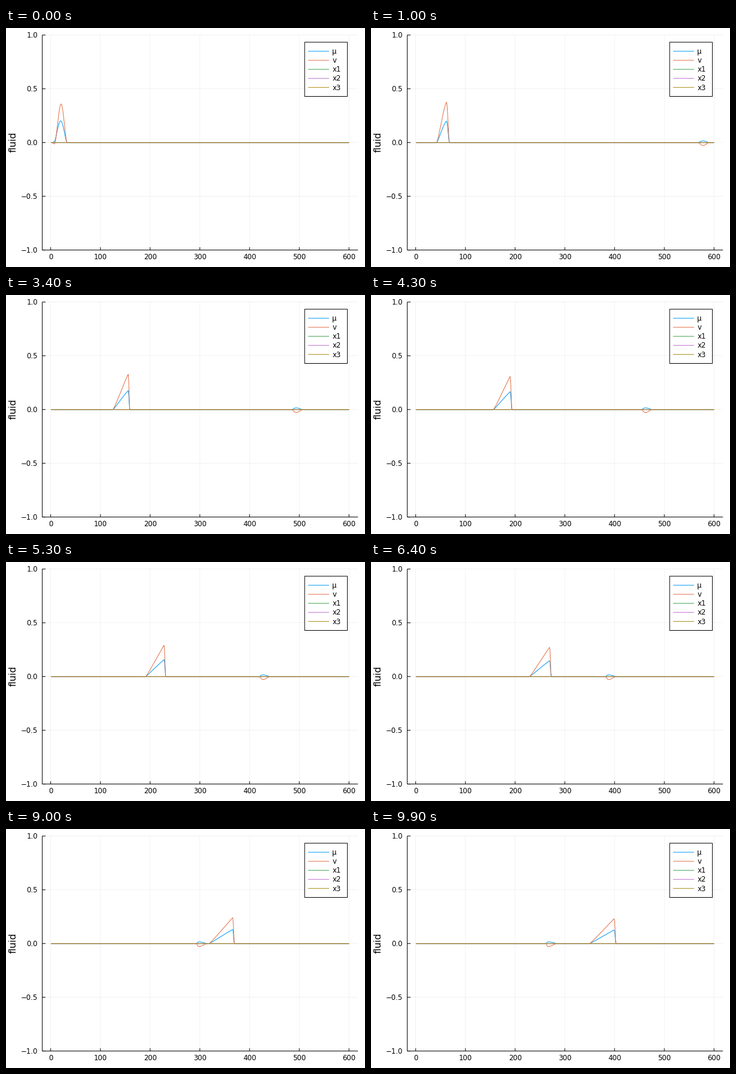
Write a matplotlib script that moves like this. It is 600x400 px and loops after 10 s.

```python
import numpy as np
import matplotlib.pyplot as plt
from matplotlib.animation import FuncAnimation
from matplotlib.patches import Rectangle

FRAMES, INTERVAL = 100, 100
PT = 0.72  # points per pixel at 100 dpi
LEFT, RIGHT, TOP, BOTTOM = 60.6, 588.19, 11.81, 371.61
COLORS = BLUE, ORANGE, GREEN, PURPLE, OLIVE = "#009afa", "#e36f47", "#3ea44e", "#c371d2", "#ac8d18"
TICK_SIZE, GUIDE_SIZE = 11.6, 15.8

SOUND = 34.6    # cells per second
STEEPEN = 18.3  # extra speed per unit of velocity
HALF = 13.0     # half width of the strong pulse at the start
WEAK_HALF = 11.3
PERIOD = 600
cells = np.arange(1, 601)


def px(x):
    return LEFT + (x + 16.97) * (RIGHT - LEFT) / 634.94


def py(y):
    return (TOP + BOTTOM) / 2 - y * (BOTTOM - TOP) / 2


def bump(s):
    return np.clip(1 - s**2, 0, None) ** 2


def right_wave(t):
    """Velocity of the strong pulse: a steepening ramp cut off by a shock."""
    age = t + 0.1
    off = cells - (7.2 + SOUND * t)
    xi = np.linspace(0, HALF, 400)
    v0 = 0.371 * bump(1 - xi / HALF)
    reach = xi + STEEPEN * age * v0
    length = np.sqrt(170 + 232 * t)
    width = max(3.3, 2 * HALF - length)
    peak = np.interp(length, reach, v0)
    rear = np.interp(off, reach, v0, left=0)
    v = np.where(off < length, rear, peak * bump((off - length) / width))
    tip = 0.011 * np.exp(-(((t - 1.5) / 0.7) ** 2))
    return v + tip * np.exp(-(((off - length) / 1.5) ** 2))


def left_wave(t):
    """Strength of the weak pulse, which wraps round the left edge."""
    age = t + 0.1
    delay = 1.5 * np.clip((t - 8) / 0.75, 0, 1)  # slowed while crossing
    center = 16.8 - SOUND * age + delay
    ahead = (center - cells + PERIOD / 2) % PERIOD - PERIOD / 2
    xi = np.linspace(-WEAK_HALF, WEAK_HALF, 400)
    v0 = 0.028 * bump(xi / WEAK_HALF)
    return np.interp(ahead, xi + STEEPEN * age * v0, v0, left=0, right=0)


def density(v):
    return v * (0.575 - 0.12 * v)


plt.rcParams["font.family"] = "DejaVu Sans"
fig = plt.figure(figsize=(6, 4), dpi=100, facecolor="white")
ax = fig.add_axes([0, 0, 1, 1])
ax.set(xlim=(0, 600), ylim=(400, 0))
ax.axis("off")


def line(xs, ys, color="black", z=3, width=1.0, **kw):
    return ax.plot(xs, ys, color=color, lw=width * PT, zorder=z, snap=False,
                   solid_capstyle="butt", **kw)[0]


def grid(xs, ys):
    line(xs, ys, z=1, width=0.5, alpha=0.1)


def label(x, y, s, size=TICK_SIZE, **kw):
    ax.text(x, y, s, fontsize=size * PT, color="black", zorder=6, **kw)


for n in range(0, 601, 100):
    x = px(n)
    grid([x, x], [TOP, BOTTOM])
    line([x, x], [BOTTOM, BOTTOM - 4.7])
    label(x, 387.3, str(n), ha="center")
for v in (-1, -0.5, 0, 0.5, 1):
    y = py(v)
    grid([LEFT, RIGHT], [y, y])
    line([LEFT, LEFT + 5.5], [y, y])
    label(53, y + 4.2, f"{v:.1f}".replace("-", "\u2212"), ha="right")
line([LEFT, LEFT], [TOP, BOTTOM])
line([LEFT, RIGHT], [BOTTOM, BOTTOM])
label(16.5, 191.2, "fluid", GUIDE_SIZE, rotation=90, rotation_mode="anchor",
      ha="center", va="baseline")

mu_line = line([], [], BLUE, 4)
v_line = line([], [], ORANGE, 4)
for color in (GREEN, PURPLE, OLIVE):
    line(px(cells[[0, -1]]), [py(0), py(0)], color, 4)

ROW = 15.12
box_top = TOP + (BOTTOM - TOP) / 30
box_right = RIGHT - (RIGHT - LEFT) / 30
ax.add_patch(Rectangle((499.1, box_top), box_right - 499.1, 6 * ROW,
                       fc="white", ec="black", lw=PT, zorder=5, snap=False))
for k, (name, color) in enumerate(zip(("\u03bc", "v", "x1", "x2", "x3"), COLORS), 1):
    y = box_top + ROW * k
    line([504.9, 540], [y, y], color, 6)
    label(545.2, y + 4.2, name)


def update(i):
    t = i * INTERVAL / 1000
    r, l = right_wave(t), left_wave(t)
    mu_line.set_data(px(cells), py(density(r) + density(l)))
    v_line.set_data(px(cells), py(r - l))
    return mu_line, v_line


anim = FuncAnimation(fig, update, frames=FRAMES, interval=INTERVAL, repeat=True, repeat_delay=0)
plt.show()
```
